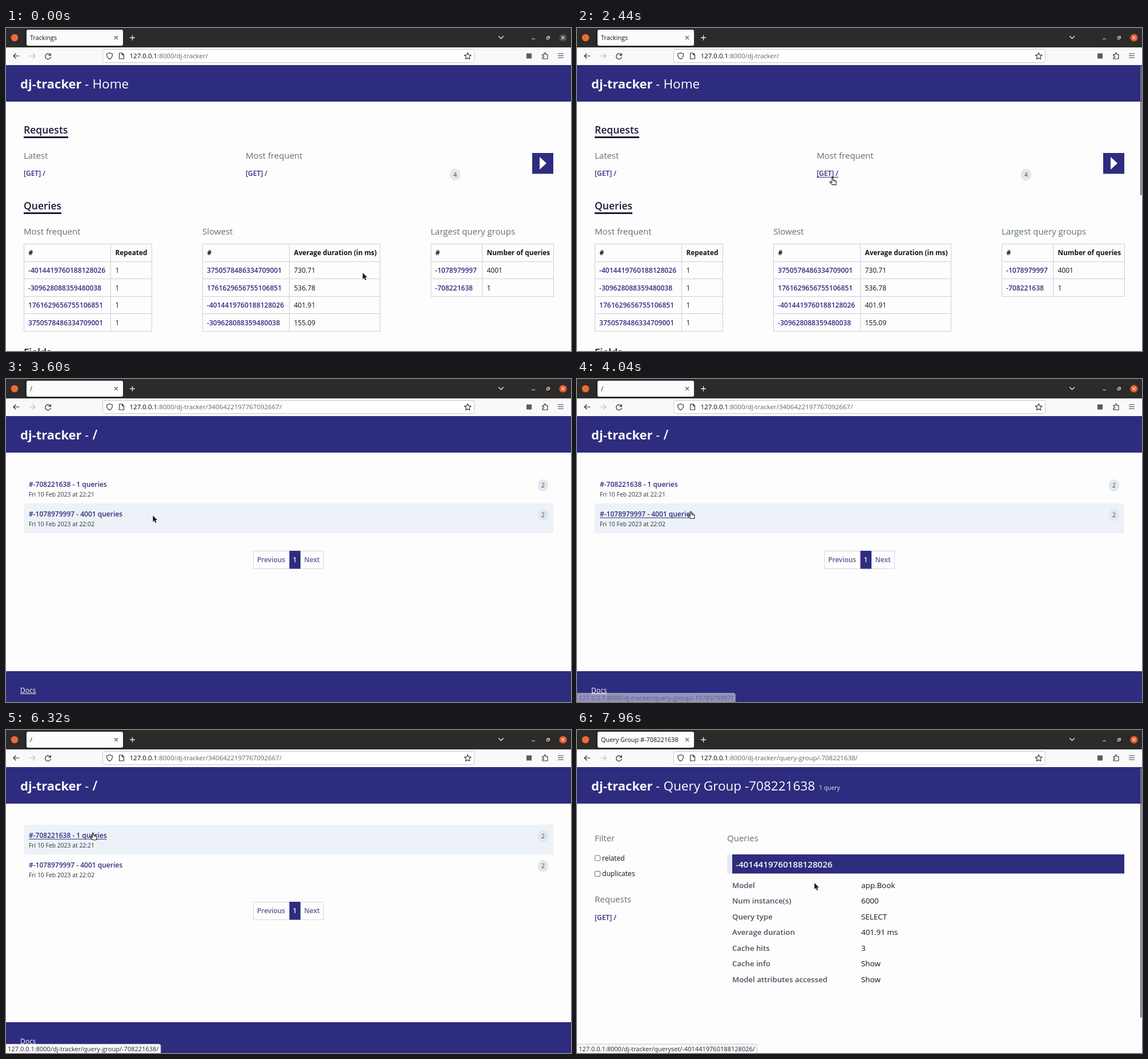
Recreate the animation shown at these times as an HTML page with a canvas. Size 990 by 566 pixels, loop 8000 ms.

```html
<!DOCTYPE html>
<html lang="en">
<head>
<meta charset="utf-8">
<title>Trackings</title>
<style>
  html, body { margin: 0; width: 100%; height: 100%; overflow: hidden; background: #fdfdfd; }
  canvas { display: block; width: 990px; height: 566px; }
</style>
</head>
<body>
<canvas id="stage" width="990" height="566"></canvas>
<script>
const ctx = document.getElementById('stage').getContext('2d');
const LOOP = 8000, STEP = 40;
const NAVY = '#2e2c7e', INK = '#1c1a36', MUTED = '#5f7079', LINE = '#cfcdda', BLACK = '#12121a';
const FONT = '"Open Sans", "Noto Sans", sans-serif';
const HOST = '127.0.0.1', BASE = ':8000/dj-tracker/';
const TO_REQUEST = 2760, TO_GROUP = 6480;

const clamp = v => Math.max(0, Math.min(1, v));
const ramp = (t, a, b) => clamp((t - a) / (b - a));

function rect(x, y, w, h, color) {
  ctx.fillStyle = color;
  ctx.fillRect(x, y, w, h);
}

function round(x, y, w, h, r, fill, stroke) {
  ctx.beginPath();
  ctx.roundRect(x, y, w, h, r);
  if (fill) { ctx.fillStyle = fill; ctx.fill(); }
  if (stroke) { ctx.strokeStyle = stroke; ctx.lineWidth = 1; ctx.stroke(); }
}

function disc(x, y, r, color) {
  ctx.beginPath();
  ctx.arc(x, y, r, 0, 7);
  ctx.fillStyle = color;
  ctx.fill();
}

// Draws text on a baseline and returns its width
function text(str, x, y, size, color, weight = 400, align = 'left') {
  ctx.font = `${weight} ${size}px ${FONT}`;
  ctx.textAlign = align;
  ctx.fillStyle = color;
  ctx.fillText(str, x, y);
  return ctx.measureText(str).width;
}

function path(d, x, y, stroke, width = 1.2, fill) {
  const p = new Path2D(d);
  ctx.save();
  ctx.translate(x, y);
  ctx.lineJoin = ctx.lineCap = 'round';
  if (fill) { ctx.fillStyle = fill; ctx.fill(p); }
  if (stroke) { ctx.strokeStyle = stroke; ctx.lineWidth = width; ctx.stroke(p); }
  ctx.restore();
}

function link(str, x, y, size, hover) {
  const w = text(str, x, y, size, NAVY, 600);
  if (hover) rect(x, y + 2, w, 1, NAVY);
}

function badge(n, x, y) {
  round(x - 9, y - 10.5, 18, 21, 9, '#e1e7ed');
  text(n, x, y + 4, 10.3, '#384552', 400, 'center');
}

function burst(t, start) {
  const p = ramp(t, start, start + 280);
  if (p <= 0 || p >= 1) return;
  ctx.globalAlpha = 0.9 * (1 - p * p);
  disc(48.5, 17, 3 + 5 * Math.sqrt(p), '#8cc4f8');
  ctx.globalAlpha = 1;
}

function star(x, y, r) {
  let d = '';
  for (let i = 0; i < 10; i++) {
    const a = i * Math.PI / 5 - Math.PI / 2, k = i % 2 ? r * 0.48 : r;
    d += (i ? 'L' : 'M') + Math.cos(a) * k + ' ' + Math.sin(a) * k;
  }
  path(d + 'Z', x, y, '#2b2a33', 1.1);
}

function chrome(t, title, rest, loadedAt) {
  const dark = '#2b2a33', pale = '#eeeeec';
  rect(0, 0, 990, 34, '#2c2b2a');
  disc(15, 17, 6.3, '#ef6a35');
  rect(33, 4, 1, 27, '#1d1c1c');
  round(36, 3, 169, 28, 3, '#fcfcfc');
  burst(t, loadedAt);
  text(title, 42, 21, 10.9, BLACK);
  path('M-2.5-2.5L2.5 2.5M2.5-2.5L-2.5 2.5', 193, 17, '#3c3b44', 1.1);
  path('M-4 0H4M0-4V4', 221.5, 17, pale, 1.3);
  path('M-4-2L0 2L4-2', 867.5, 16.5, pale, 1.3);
  path('M-2.5 0H2.5', 924, 19, pale, 1.2);
  path('M-2-1H1.5V2.5H-2ZM-.5-1V-2.5H3V1H1.5', 949.5, 17, pale, 0.9);
  disc(976, 17, 6.6, t < 80 ? '#4d4b4a' : '#e6582c');
  path('M-2.3-2.3L2.3 2.3M2.3-2.3L-2.3 2.3', 976, 17, '#fff', 1.1);

  rect(0, 34, 990, 31, '#f9f9fa');
  path('M5 0H-5M-1-4L-5 0L-1 4', 18, 49, dark, 1.2);
  path('M-5 0H5M1-4L5 0L1 4', 46, 49, '#bcbcc1', 1.2);
  path('M4.4-1.8A4.8 4.8 0 1 0 4.7 1.5M4.8-5V-1.6H1.4', 73.5, 49.5, dark, 1.2);
  round(169.5, 37.5, 651, 23, 3, '#fff', '#c9c9ce');
  path('M0-5.5L5-3.8C5 1 3.5 4 0 5.5C-3.5 4-5 1-5-3.8Z', 181.5, 49, dark, 1.1);
  path('M-4-5H1L4-2V5H-4ZM1-5V-2H4', 202.5, 49, dark, 1.1);
  const w = text(HOST, 216.5, 53, 11.5, '#000');
  text(BASE + rest, 216.5 + w, 53, 11.5, '#66656d');
  star(809, 49.5, 6.2);
  round(912, 44.5, 9, 9, 0, '#5b5a63');
  path('M-4.5-2.5H-1.5V-4A1.4 1.4 0 0 1 1.3-4V-2.5H4.5V5H-4.5V2.5H-3A1.4 1.4 0 0 0-3-.2H-4.5Z', 944.5, 49, dark, 1.1);
  path('M-4.5-3.5H4.5M-4.5 0H4.5M-4.5 3.5H4.5', 972, 48.5, '#3a3768', 1.2);
}

function banner(rest, weight = 400) {
  rect(0, 65, 990, 64, NAVY);
  text('dj-tracker', 25, 105.5, 22, '#f6f8fc', 700);
  text('-', 138, 105.5, 22.5, '#fff');
  text(rest, 151.5, 105.5, 22.5, '#fff', weight);
}

function table(cols, head, rows) {
  const [x0, x1, x2] = cols, top = 379, rowH = 30.6;
  const bottom = Math.round(top + rowH * (rows.length + 1));
  for (let i = 0; i <= rows.length + 1; i++) rect(x0, Math.round(top + i * rowH) - 1, x2 - x0, 1, LINE);
  for (const x of cols) rect(x, top - 1, 1, bottom - top + 1, LINE);
  head.forEach((h, i) => text(h, cols[i] + 8.5, 398.3, 11.8, BLACK, 700));
  rows.forEach(([id, value], i) => {
    const y = 429 + i * rowH;
    text(id, x0 + 8, y, 12.1, NAVY, 600);
    text(value, x1 + 8.5, y, 12, BLACK);
  });
}

function heading(str, y, w) {
  text(str, 31, y, 17.5, INK, 600);
  rect(31, y + 5, w, 3, INK);
}

function home(t, hot) {
  chrome(t, 'Trackings', '', LOOP);
  banner('Home');
  heading('Requests', 185, 78);
  text('Latest', 31, 229, 15, MUTED);
  text('Most frequent', 420, 229, 15, MUTED);
  link('[GET] /', 31, 259, 12, false);
  link('[GET] /', 420, 259, 12, hot === 0);
  badge('4', 787, 257);
  rect(922, 219, 37, 36.5, NAVY);
  path('M0 0V22L12 11Z', 935, 226, null, 0, '#fff');

  heading('Queries', 318, 66);
  text('Most frequent', 31, 362, 15, MUTED);
  text('Slowest', 344, 362, 15, MUTED);
  text('Largest query groups', 744, 362, 15, MUTED);
  const a = '-4014419760188128026', b = '-309628088359480038';
  const c = '1761629656755106851', d = '3750578486334709001';
  table([31, 183, 255], ['#', 'Repeated'], [a, b, c, d].map(id => [id, '1']));
  table([344, 496, 655], ['#', 'Average duration (in ms)'],
    [[d, '730.71'], [c, '536.78'], [a, '401.91'], [b, '155.09']]);
  table([744, 834, 959], ['#', 'Number of queries'], [['-1078979997', '4001'], ['-708221638', '1']]);
  heading('Fields', 575, 48);
}

function request(t, hot, pos) {
  chrome(t, '/', '3406422197767092667/', TO_REQUEST + 80);
  banner('/', 600);
  const rows = [['#-708221638 - 1 queries', '22:21'], ['#-1078979997 - 4001 queries', '22:02']];
  rows.forEach(([label, time], i) => {
    const y = 166 + i * 52;
    if (pos.y >= y && pos.y < y + 52) rect(31, y, 928, 52, '#ecf2f7');
    link(label, 40, y + 22.7, 12, hot === i);
    text('Fri 10 Feb 2023 at ' + time, 40, y + 39.7, 10.4, '#30343f');
    badge('2', 941, y + 20.3);
  });
  round(433.5, 301.5, 123, 31, 0, '#fdfdfd', '#d6d6de');
  rect(496.5, 301, 19.5, 31.5, NAVY);
  text('Previous', 440, 321, 11.9, '#5d5a94', 600);
  text('1', 506, 321, 12, '#f0f1f8', 600, 'center');
  text('Next', 522.5, 321, 11.9, '#5d5a94', 600);
  rect(0, 512, 990, 54, NAVY);
  const w = text('Docs', 25, 549.5, 12, '#fff');
  rect(25, 551, w, 1, '#eceef6');
}

function group(t) {
  chrome(t, 'Query Group #-708221638', 'query-group/-708221638/', TO_GROUP + 40);
  banner('Query Group -708221638');
  text('1 query', 424, 105, 10.4, '#e6e8f4');
  text('Filter', 31, 195, 15, MUTED);
  ['related', 'duplicates'].forEach((label, i) => {
    round(31.5, 220 + i * 27.5, 9, 9, 1.5, '#fff', '#6b6a73');
    text(label, 44, 228.7 + i * 27.5, 12.1, BLACK);
  });
  text('Requests', 31, 302, 15, MUTED);
  link('[GET] /', 31, 332.5, 12, false);
  text('Queries', 263, 195, 15, MUTED);
  rect(263, 218, 9, 33.5, '#e7e8f4');
  rect(272, 218, 687, 33.5, NAVY);
  text('-4014419760188128026', 278, 241, 15.2, '#f6f8fc', 600);
  [['Model', 'app.Book'], ['Num instance(s)', '6000'], ['Query type', 'SELECT'],
    ['Average duration', '401.91 ms'], ['Cache hits', '3'], ['Cache info', 'Show'],
    ['Model attributes accessed', 'Show']].forEach(([name, value], i) => {
    const y = 276.7 + i * 27.5;
    text(name, 272, y, 13.2, '#465260', 600);
    text(value, 498, y, 13.4, BLACK);
  });
}

// Pointer keys: time, x, y
const KEYS = [
  [0, 625, 429], [360, 625, 429], [600, 454, 354], [2160, 454, 354],
  [2480, 446, 258], [2700, 446, 262], [3000, 446, 262], [3880, 198, 232],
  [4520, 198, 232], [4760, 153, 180], [4880, 153, 180], [4920, 151, 180],
  [7040, 151, 180], [7480, 300, 222], [7880, 385, 226], [7960, 416, 268]
];

function pointerAt(t) {
  const i = KEYS.findIndex(k => k[0] > t);
  if (i < 0) return { x: 416, y: 268 };
  const [t0, x0, y0] = KEYS[i - 1], [t1, x1, y1] = KEYS[i];
  let p = ramp(t, t0, t1);
  p = p * p * (3 - 2 * p);
  return { x: x0 + (x1 - x0) * p, y: y0 + (y1 - y0) * p };
}

// Clickable areas: left, top, right, bottom
const LINKS = {
  home: [[420, 246, 458, 264]],
  request: [[40, 177, 176, 193], [40, 229, 204, 245]],
  group: [[272, 218, 959, 251]]
};

const hit = (page, p) => LINKS[page].findIndex(([l, t, r, b]) => p.x >= l && p.x <= r && p.y >= t && p.y <= b);

function pointer(p, hand) {
  if (hand) {
    path('M.4 6.5V1.2Q.4 0 1.4 0T2.4 1.2V4.4L7 5.3Q8.2 5.6 8.1 7L7.6 10V12.5H1L-3.2 8.3Q-3.8 7.2-2.5 6.8L.4 8.6Z',
      p.x, p.y, '#222', 1.1, '#fff');
    path('M4 5V7M6 5.4V7.2', p.x, p.y, '#222', 0.8);
  } else {
    const arrow = 'M0 0V11.2L2.6 8.8L4.4 13L6.3 12.2L4.5 8.1H8Z';
    path(arrow, p.x, p.y, '#fff', 1.6);
    path(arrow, p.x, p.y, null, 0, '#1c1c1c');
  }
}

// Link preview: start, end, fade time, address
const PREVIEWS = [
  [2540, TO_REQUEST, 180, '3406422197767092667/'],
  [3940, 4700, 200, 'query-group/-1078979997/'],
  [4700, TO_GROUP, 0, 'query-group/-708221638/'],
  [7580, LOOP, 180, 'queryset/-4014419760188128026/']
];

function preview(t) {
  const cur = PREVIEWS.find(([a, b]) => t >= a && t < b);
  if (!cur) return;
  const str = HOST + BASE + cur[3], size = 11.05;
  ctx.globalAlpha = cur[2] ? ramp(t, cur[0], cur[0] + cur[2]) : 1;
  ctx.font = `400 ${size}px ${FONT}`;
  const w = ctx.measureText(str).width;
  round(-1.5, 550.5, w + 8, 18, [0, 3, 0, 0], '#f9f9fb', '#c6c6cc');
  text(str, 3, 563, size, '#2a2932');
  ctx.globalAlpha = 1;
}

function scrollbar(alpha, h) {
  ctx.globalAlpha = alpha;
  round(987, 67, 2.5, h, 1.2, '#74737c');
  ctx.globalAlpha = 1;
}

function draw(t) {
  const page = t < TO_REQUEST ? 'home' : t < TO_GROUP ? 'request' : 'group';
  const pos = pointerAt(t), hot = hit(page, pos);
  rect(0, 0, 990, 566, '#fdfdfd');
  if (page === 'home') {
    home(t, hot);
    scrollbar(t < 2160 ? ramp(t, 360, 480) * (1 - ramp(t, 1600, 2000)) : ramp(t, 2160, 2280), 226);
  } else if (page === 'request') {
    request(t, hot, pos);
  } else {
    group(t);
    scrollbar(ramp(t, TO_GROUP, TO_GROUP + 120), 437);
  }
  preview(t);
  pointer(pos, hot >= 0);
}

let start;
function tick(now) {
  start ??= now;
  draw(Math.floor(((now - start) % LOOP) / STEP) * STEP);
  requestAnimationFrame(tick);
}
draw(0);
requestAnimationFrame(tick);
</script>
</body>
</html>
```
